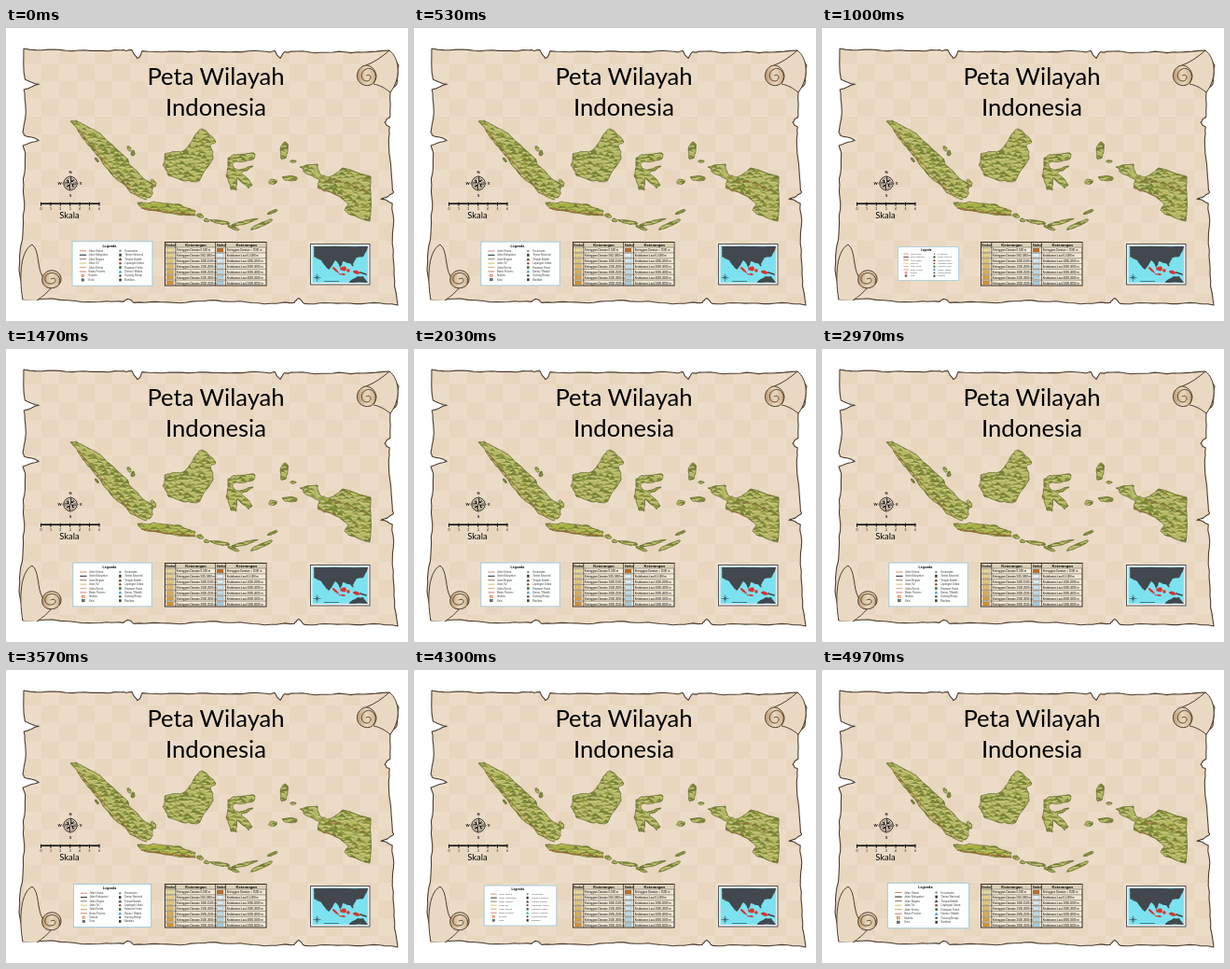
These frames come from a looping animation (431x314 px, 5.01 s). An HTML page:

```html
<!DOCTYPE html>
<html lang="id">
<head>
<meta charset="utf-8">
<title>Peta Wilayah Indonesia</title>
<style>
  html, body { margin: 0; width: 100%; height: 100%; overflow: hidden; background: #fff; }
  svg { display: block; width: 431px; height: 314px; }
  text { font-family: "Comic Sans MS", "Comic Neue", Lato, sans-serif; fill: #000; }
  .small { font-family: "Liberation Sans", Arial, sans-serif; }
</style>
</head>
<body>
<svg id="stage" viewBox="0 0 431 314" xmlns="http://www.w3.org/2000/svg"></svg>
<script>
let seed = 11;
const rnd = () => (seed = (seed * 16807) % 2147483647) / 2147483647;
const range = n => [...Array(n).keys()];
const pairs = s => s.trim().split(/\s+/).map(p => p.split(',').map(Number));

// Breaks each edge with small sideways shifts, for torn paper and coasts.
function rough(pts, amp, passes = 2) {
  for (let n = 0; n < passes; n++, amp /= 2) {
    pts = pts.flatMap((a, i) => {
      const b = pts[(i + 1) % pts.length];
      const dx = b[0] - a[0], dy = b[1] - a[1], len = Math.hypot(dx, dy) || 1;
      const k = len < 2 ? 0 : (rnd() - .5) * 2 * amp;
      return [a, [(a[0] + b[0]) / 2 - dy / len * k, (a[1] + b[1]) / 2 + dx / len * k]];
    });
  }
  return pts;
}
const toPath = pts => 'M' + pts.map(p => p.map(v => v.toFixed(1)).join()).join('L') + 'Z';
const path = (d, fill, stroke = 'none', w = 1, more = '') =>
  `<path d="${d}" fill="${fill}" stroke="${stroke}" stroke-width="${w}" stroke-linejoin="round" ${more}/>`;
const rect = (x, y, w, h, fill, stroke = 'none', sw = .6) =>
  `<rect x="${x}" y="${y}" width="${w}" height="${h}" fill="${fill}" stroke="${stroke}" stroke-width="${sw}"/>`;
const text = (x, y, size, s, more = '') =>
  `<text x="${x}" y="${y}" font-size="${size}" ${more}>${s}</text>`;

// A wavy side of the sheet; each tear is [distance along, depth].
function side([ax, ay], [bx, by], tears) {
  const len = Math.hypot(bx - ax, by - ay), ux = (bx - ax) / len, uy = (by - ay) / len;
  const stops = range(Math.round(len / 26)).map(i => [i * 26, i ? 1 + rnd() * 3 : 0])
    .filter(([s]) => tears.every(([t]) => Math.abs(s - t) > 9));
  tears.forEach(([t, deep]) => stops.push([t - 6, 1], [t, deep], [t + 5, 2]));
  return stops.sort((p, q) => p[0] - q[0])
    .map(([s, d]) => [ax + ux * s - uy * d, ay + uy * s + ux * d]);
}

function parchment() {
  const edge = toPath(rough([
    ...side([19, 22], [411, 24], [[122, 10], [275, 9]]),
    [411, 24], [421, 40], [419, 60],
    ...side([412, 69], [420, 297], [[32, 7], [114, 14]]),
    ...side([420, 297], [62, 295], [[106, 7], [289, 5]]),
    [50, 290], [18, 291], [14, 260],
    ...side([15, 240], [19, 22], [[120, 18], [180, 17]])
  ], 1.1));
  const ink = '#4b3d30';
  return `<defs>
    <pattern id="checks" width="38" height="38" patternUnits="userSpaceOnUse">
      ${rect(0, 0, 38, 38, '#ecdcc7')}${rect(0, 0, 19, 19, '#e8d6bf')}${rect(19, 19, 19, 19, '#e8d6bf')}
    </pattern>
    <linearGradient id="roll"><stop stop-color="#bd9b72"/><stop offset=".5" stop-color="#ead8bd"/>
      <stop offset="1" stop-color="#cdb08a"/></linearGradient></defs>`
    + path(edge, 'url(#checks)', ink, 1.1)
    // upper right curl
    + path('M386,40C396,36 403,31 411,24C421,31 425,52 412,69C406,64 400,61 394,60', '#ead9c2', ink)
    + path('M386,40C377,41 373,53 380,59C388,65 397,60 397,51C396,44 391,40 386,40Z', 'url(#roll)', ink)
    + path('M394,59C400,50 393,41 386,44C379,47 380,57 387,57C393,56 392,48 386,51', 'none', ink, .9)
    // lower left curl
    + path('M18,291C15,276 13,240 28,232C36,238 33,256 39,266L48,279C44,284 39,288 33,292', '#ead9c2', ink)
    + path('M47,260C37,262 36,275 44,278C52,281 60,275 59,268C58,262 53,259 47,260Z', 'url(#roll)', ink)
    + path('M57,274C60,264 50,260 44,264C39,269 43,275 49,274C55,273 54,266 48,269', 'none', ink, .9);
}

const sumatra = '69,100 75,99 101,113 129,139 132,146 147,161 154,165 157,172 155,181 150,184 133,176 115,159 94,132 81,116';
const kalimantan = '170,135 187,133 197,124 206,111 212,109 225,122 219,126 222,140 207,164 193,164 174,158 168,147';
const sulawesi = '238,139 246,136 266,134 266,140 246,143 243,147 248,152 265,148 252,155 264,168 260,172 248,160 247,174 241,173 236,158';
const papua = '315,149 334,146 338,158 345,160 361,150 391,159 390,207 369,200 363,195 367,189 349,176 334,171 337,163 319,154';
const jawa = '141,187 158,186 187,189 203,196 203,201 171,198 148,194';

// Small islands: centre, half length, half width, turn in degrees.
const islets = [
  [208, 201, 4, 2, 10], [215, 206, 3, 2, 0], [230, 208, 12, 2, 8], [256, 208, 13, 2, -14],
  [244, 214, 6, 2, 20], [275, 210, 15, 2, -25], [286, 197, 6, 1.5, -27],
  [298, 132, 4, 10, 8], [304, 161, 9, 2.5, 5], [286, 165, 5, 2.5, 0], [308, 143, 3, 1.5, 0],
  [132, 129, 2, 3, -30], [136, 134, 2, 3, 20], [158, 166, 2, 4, -25], [97, 141, 3, 1.2, 50]
];

function blob([x, y, rx, ry, deg]) {
  const t = deg * Math.PI / 180, c = Math.cos(t), s = Math.sin(t);
  return range(9).map(i => {
    const a = i * Math.PI * 2 / 9, k = .75 + rnd() * .45;
    const px = Math.cos(a) * rx * k, py = Math.sin(a) * ry * k;
    return [x + px * c - py * s, y + px * s + py * c];
  });
}

function hills([x0, y0, x1, y1]) {
  let out = '';
  for (let y = y0; y < y1 + 4; y += 4.5) {
    for (let x = x0; x < x1 + 4; x += 6) {
      const px = x + rnd() * 5, py = y + rnd() * 4, h = 2 + rnd() * 2.5, w = 3 + rnd() * 3;
      const tone = rnd() < .6 ? '#788337' : '#8f963f';
      out += path(`M${px - w},${py}Q${px - 1},${py - h} ${px},${py - h}Q${px + 2},${py - h + 1} ${px + w},${py + 1}Q${px},${py - 1} ${px - w},${py}`, tone)
        + path(`M${px - w},${py + 1}q${w},-1.5 ${w * 1.6},.5`, 'none', '#d2cf8a', .8);
    }
  }
  return out;
}

function island(pts, i) {
  const d = toPath(pts), xs = pts.map(p => p[0]), ys = pts.map(p => p[1]);
  const box = [Math.min(...xs), Math.min(...ys), Math.max(...xs), Math.max(...ys)];
  return `<clipPath id="land${i}"><path d="${d}"/></clipPath>`
    + path(d, i === 4 ? '#a8b243' : '#b4b866')
    + `<g clip-path="url(#land${i})">${hills(box)}</g>`
    + path(d, 'none', '#5d642c', .7);
}

const islands = () => [
  ...[sumatra, kalimantan, sulawesi, papua, jawa].map(s => rough(pairs(s), 1.6, 3)),
  ...islets.map(b => rough(blob(b), .5, 1))
].map(island).join('');

const ridges = () =>
  path('M76,108C88,120 96,132 105,142S126,167 142,180', 'none', '#a8643a', 1, 'stroke-dasharray="6 1.5"')
  + path('M145,193L171,197L201,200', 'none', '#a55a34', 1, 'stroke-dasharray="5 1"')
  + path('M335,171L360,181M346,164L362,165L388,177', 'none', '#a06c3c', .8);

function compass() {
  const star = (r, turn) => path(`M0,${-r}L1.7,-1.7L${r},0L1.7,1.7L0,${r}L-1.7,1.7L${-r},0L-1.7,-1.7Z`,
    '#2c2520', 'none', 0, `transform="rotate(${turn})"`);
  const glint = range(4).map(i => path('M0,-9V0L-1.6,-1.6Z', '#f0e2cf', 'none', 0, `transform="rotate(${i * 90})"`));
  const marks = [['N', 0, -10.5], ['S', 0, 14], ['W', -11.5, 1.5], ['E', 11.5, 1.5]];
  return `<g transform="translate(69,166.5)">
    <circle r="7.2" fill="none" stroke="#2c2520"/>
    <circle r="5.4" fill="none" stroke="#2c2520" stroke-width=".5"/>
    ${star(6, 45)}${star(9.5, 0)}${glint.join('')}
    ${marks.map(([s, x, y]) => text(x, y, 4, s, 'text-anchor="middle" font-weight="bold"')).join('')}</g>`;
}

const scaleBar = () => rect(37, 187.4, 63.5, 1.7, '#111')
  + range(7).map(i => rect(37 + i * 10.4, 186.8, 1, 4, '#111')
    + text(37.5 + i * 10.4, 194.8, 3.4, i, 'text-anchor="middle"')).join('')
  + text(68, 204, 9.4, 'Skala', 'text-anchor="middle"');

function heightTable() {
  const rh = 5.85, top = 235;
  let out = rect(170.5, 229.5, 108.5, 46.5, '#f2e8d6', '#332b24', 1) + rect(171, 230, 107.5, 4.7, '#dccfb6');
  [170.5, 224.8].forEach(x => {
    out += text(x + 6, 233.7, 3.1, 'Simbol', 'class="small" font-weight="bold" text-anchor="middle"')
      + text(x + 33, 233.9, 4.1, 'Keterangan', 'class="small" font-weight="bold" text-anchor="middle"');
  });
  range(7).forEach(i => {
    const y = top + i * rh;
    const tan = `hsl(${50 - i * 2.5} 62% ${75 - i * 4}%)`;
    const blue = i ? `hsl(198 45% ${96 - i * 3.5}%)` : '#b96b25';
    const land = `Ketinggian Daratan ${i * 500}-${i * 500 + 500} m`;
    const sea = i ? `Kedalaman Laut ${i * 1000 - 1000}-${i * 1000} m` : 'Ketinggian Daratan &gt; 3500 m';
    out += rect(172.5, y + 1, 7, 4, tan, '#887548', .3) + rect(226, y + 1, 7, 4, blue, '#74848a', .3)
      + text(183, y + 4.4, 2.9, land, 'class="small"')
      + text(236.7, y + 4.4, 2.9, sea, 'class="small"')
      + path(`M170.5,${y}H279`, 'none', '#4b4236', .5);
  });
  return out + path('M181.8,229.5V276M224.5,229.5V276M235.4,229.5V276', 'none', '#332b24', .7);
}

function inset() {
  const land = '#42484e';
  const asia = rough(pairs('330,234 388,234 383,245 376,246 372,253 361,250 358,257 353,249 346,259 338,249 330,245'), 1, 3);
  const south = rough(pairs('369,271 377,266 383,266 388,273 368,273'), .4);
  const reds = [[353, 259, 5, 1.2, 45], [361, 264, 4, .9, 5], [362, 258, 3.4, 2.8, 0], [367, 260, 1.6, 2.2, 0], [376, 262, 3.6, 1.8, 15]];
  return rect(326.5, 231.5, 63.5, 43.5, '#f4f4f2', '#4c5358', 1) + rect(328.5, 233.5, 59.5, 39.5, '#7de2ef')
    + path(toPath(asia), land) + path(toPath(south), land)
    + reds.map(b => path(toPath(blob(b)), '#d9332f')).join('')
    + path('M367,246L372,255M380,262L386,264Z', 'none', land, 1.8)
    + path('M333.5,263.5v8m-4,-4h8m-6,-2l4,4m0,-4l-4,4M341,271.5h16', 'none', '#26414a', .6);
}

// Legend card, laid out around its own centre at its largest size.
function legend() {
  const left = ['Jalan Utama', 'Jalan Kabupaten', 'Jalan Negara', 'Jalan Tol', 'Jalan Kereta', 'Batas Provinsi', 'Ibukota', 'Kota'];
  const right = ['Kecamatan', 'Taman Nasional', 'Tempat Ibadah', 'Lapangan Udara', 'Kawasan Hutan', 'Danau / Waduk', 'Gunung Berapi', 'Bandara'];
  const inks = ['#c86b48', '#3b3b3b', '#7b5038', '#d0a94a', '#c98c4b', '#c25a45', '#d0582f', '#3d3d3d'];
  const marks = ['#88908b', '#30302e', '#5c4a35', '#8a4a36', '#3f6c40', '#4aa5bf', '#4a4641', '#333'];
  let out = rect(-48.2, -26.7, 96.4, 53.4, '#fdfefe', '#a7cbd9', 1.2)
    + text(-3.5, -20, 4.1, 'Legenda', 'class="small" font-weight="bold" text-anchor="middle"');
  range(8).forEach(i => {
    const y = -15.4 + i * 5;
    out += i < 6 ? path(`M-39.5,${y}h8.2`, 'none', inks[i], i === 1 ? 1.3 : .9)
      : rect(-37, y - 1.3, 3, 2.6, i === 6 ? '#f3c9a0' : '#777', inks[i], .6);
    out += i % 3 === 0 ? `<circle cx="9.5" cy="${y}" r="1.4" fill="${marks[i]}"/>`
      : i % 3 === 1 ? rect(8.2, y - 1.6, 2.7, 3.2, marks[i])
      : path(`M7.2,${y + 1.6}L9.5,${y - 1.8}L11.8,${y + 1.6}Z`, marks[i]);
    out += text(-28.5, y + 1.1, 3.1, left[i], 'class="small" style="fill:#444"')
      + text(15, y + 1.1, 3.1, right[i], 'class="small" style="fill:#444"');
  });
  return `<g id="legend">${out}</g>`;
}

const title = (y, s) => text(225, y, 25.6, s, 'text-anchor="middle"');
document.getElementById('stage').innerHTML = parchment()
  + title(61, 'Peta Wilayah') + title(93.5, 'Indonesia')
  + islands() + ridges()
  + compass() + scaleBar() + heightTable() + inset() + legend();

const card = document.getElementById('legend');
const LOOP = 5010, CYCLE = 45, PEAK = 7.5, WIDE = 97.6, RATE = 1.41;

// Thirty steps a second; the width falls evenly on both sides of each peak.
function draw(now) {
  const step = Math.min(149, Math.floor((now % LOOP + 5) * .03));
  const away = Math.abs(step % CYCLE - PEAK);
  const width = WIDE - RATE * Math.min(away, CYCLE - away);
  card.setAttribute('transform', `translate(114,252.5) scale(${(width / WIDE).toFixed(4)})`);
}
const start = performance.now();
function tick() {
  draw(performance.now() - start);
  requestAnimationFrame(tick);
}
tick();
</script>
</body>
</html>
```
